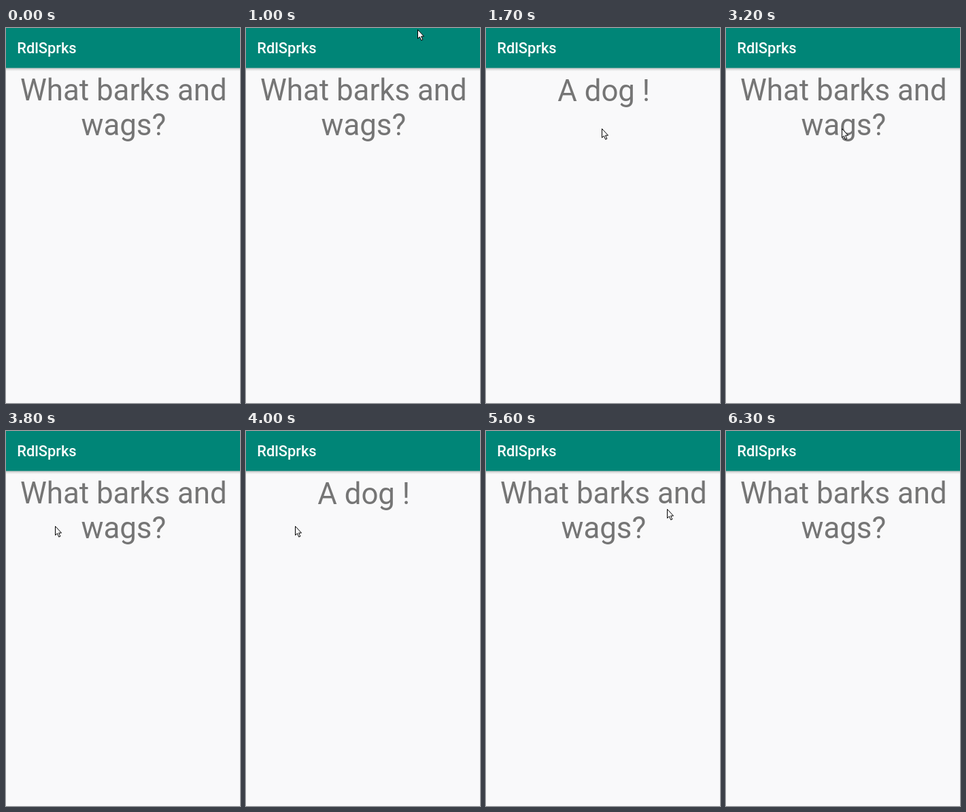
An HTML page for the animation above (7100 ms loop, 344 by 549 pixels).

```html
<!DOCTYPE html>
<html lang="en">
<head>
<meta charset="utf-8">
<title>Flip card</title>
<style>
  html, body { margin: 0; width: 100%; height: 100%; overflow: hidden; background: #f9f9fa; }
  svg { display: block; width: 344px; height: 549px; font-family: Roboto, sans-serif; }
  .card { font-size: 43.8px; fill: #757575; text-anchor: middle; }
  .title { font-size: 21.8px; font-weight: 500; fill: #fff; }
</style>
</head>
<body>
<svg viewBox="0 0 344 549">
  <defs>
    <linearGradient id="shadow" x2="0" y2="1">
      <stop stop-color="#000" stop-opacity=".24"/>
      <stop offset="1" stop-color="#000" stop-opacity="0"/>
    </linearGradient>
  </defs>
  <rect width="344" height="549" fill="#f9f9fa"/>
  <rect y="58" width="344" height="5" fill="url(#shadow)"/>
  <rect width="344" height="58.5" fill="#008577"/>
  <text class="title" x="16.3" y="36.5">RdlSprks</text>
  <g class="card" id="question">
    <text x="172.8" y="105.5">What barks and</text>
    <text x="172.8" y="156.8">wags?</text>
  </g>
  <text class="card" id="answer" x="173.2" y="107">A dog !</text>
  <path id="cursor" d="M.5 .5V13.6L3.4 10.9L5.7 16.1L7.8 15.2L5.6 10.2H9.5Z"
        fill="#fff" stroke="#000"/>
</svg>
<script>
const LOOP = 7100, STEP = 100;
const question = document.getElementById('question');
const answer = document.getElementById('answer');
const cursor = document.getElementById('cursor');

const smooth = p => p * p * (3 - 2 * p);
const easeOut = p => 1 - (1 - p) ** 2;

// Each move: first change, number of steps, end point, easing
const moves = [
  [1200, 3, 170, 147, smooth],
  [3300, 3, 80, 141, smooth],
  [3700, 2, 72, 139, easeOut],
  [4300, 8, 266, 114, smooth],
  [5900, 3, 60, 12, smooth]
];

function cursorAt(t) {
  let x = 252, y = 2;
  for (const [start, steps, endX, endY, ease] of moves) {
    if (t < start) break;
    const p = ease(Math.min(1, (Math.floor((t - start) / STEP) + 1) / steps));
    x += (endX - x) * p;
    y += (endY - y) * p;
  }
  return [Math.round(x), Math.round(y)];
}

const show = (el, on) => el.setAttribute('visibility', on ? 'visible' : 'hidden');

function draw(now) {
  const t = now % LOOP;
  const flipped = t >= 1700 && t < 3200 || t >= 4000 && t < 5600;
  show(question, !flipped);
  show(answer, flipped);
  show(cursor, t >= 1000 && t < 6300);
  cursor.setAttribute('transform', `translate(${cursorAt(t)})`);
}

const origin = performance.now();
function tick() {
  draw(performance.now() - origin);
  requestAnimationFrame(tick);
}
tick();
</script>
</body>
</html>
```
